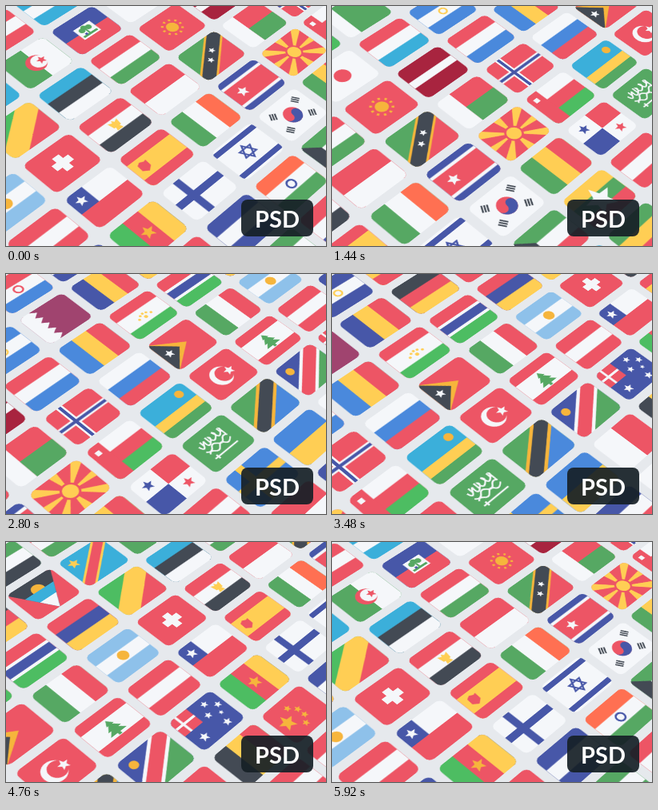
An HTML page that plays this animation: 400x300 px, repeating every 5.96 s.

```html
<!DOCTYPE html>
<html lang="en">
<head>
<meta charset="utf-8">
<title>Flags</title>
<style>
html, body { margin: 0; width: 100%; height: 100%; overflow: hidden; background: #e6e9ed; }
#stage { position: relative; width: 400px; height: 300px; overflow: hidden; background: #e6e9ed; }
#grid { position: absolute; left: 0; top: 0; transform-origin: 0 0; }
#badge {
  position: absolute; left: 294px; top: 242px; width: 90px; height: 46px; border-radius: 8px;
  background: rgba(22, 32, 39, .92); color: #fff; text-align: center;
  font: bold 29px/47px Lato, sans-serif;
}
</style>
</head>
<body>
<div id="stage">
  <svg id="grid" width="2000" height="656"></svg>
  <div id="badge">PSD</div>
</div>
<script>
const CELL_W = 100, CELL_H = 82, W = 85, H = 68, MX = W / 2, MY = H / 2;
const COLORS = {
  r: '#ed5565', w: '#f5f7fa', g: '#56a863', G: '#4dbd62', b: '#4757a8', L: '#4a89dc', s: '#3bafda',
  a: '#8ec1ea', y: '#ffce54', k: '#434a54', o: '#ff7052', m: '#a8243f', q: '#a0446f', n: '#f6b53c'
};

// Shape helpers
const rect = (x, y, w, h, c) => `<rect x="${x}" y="${y}" width="${w}" height="${h}" fill="${COLORS[c]}"/>`;
const disc = (x, y, r, c) => `<circle cx="${x}" cy="${y}" r="${r}" fill="${COLORS[c]}"/>`;
const poly = (pts, c) => `<polygon points="${pts}" fill="${COLORS[c]}"/>`;
const line = (d, c, w, extra = '') =>
  `<path d="${d}" fill="none" stroke="${COLORS[c]}" stroke-width="${w}" ${extra}/>`;
const ring = (x, y, r, c, w, dash = '') =>
  `<circle cx="${x}" cy="${y}" r="${r}" fill="none" stroke="${COLORS[c]}" stroke-width="${w}" stroke-dasharray="${dash}"/>`;
const fill = c => rect(0, 0, W, H, c);

function star(x, y, r, c) {
  const pts = [];
  for (let i = 0; i < 10; i++) {
    const a = i * Math.PI / 5, d = i % 2 ? r * .45 : r;
    pts.push((x + d * Math.sin(a)).toFixed(2), (y - d * Math.cos(a)).toFixed(2));
  }
  return poly(pts, c);
}

// Stripes: each letter is one unit of thickness, repeats make a stripe wider
function stripes(code, upright) {
  const unit = (upright ? W : H) / code.length;
  return fill(code[0]) + [...code.matchAll(/(.)\1*/g)].map(m => {
    const at = m.index * unit;
    return upright ? rect(at, 0, W - at, H, m[1]) : rect(0, at, W, H - at, m[1]);
  }).join('');
}
const rows = code => stripes(code, false);
const cols = code => stripes(code, true);

const cross = (x, c, w) => line(`M${x} 0V${H}M0 ${MY}H${W}`, c, w);
const diagonal = (upper, lower, ...bands) => fill(upper) + poly([W, 0, W, H, 0, H], lower) +
  bands.map(([c, w]) => line('M-17 81.6L102-13.6', c, w)).join('');
const crescent = (x, r, c, back) => disc(x, MY, r, c) + disc(x + r * .3, MY, r * .78, back);

function sunRays() {
  let out = fill('r');
  const end = a => `${MX + 75 * Math.cos(a)},${MY + 60 * Math.sin(a)}`;
  for (let i = 0; i < 8; i++) {
    const a = i * Math.PI / 4;
    out += poly(`${MX},${MY} ${end(a - .15)} ${end(a + .15)}`, 'y');
  }
  return out + disc(MX, MY, 14, 'r') + disc(MX, MY, 11, 'y');
}

function trigrams() {
  let out = '';
  for (const i of [-1, 1]) for (const j of [-1, 1]) {
    const turn = Math.atan2(j * 16, i * 26) * 180 / Math.PI;
    out += `<g transform="translate(${MX + i * 25} ${MY + j * 17}) rotate(${turn})">` +
      line('M-4-6V6M0-6V6M4-6V6', 'k', 2.4) + '</g>';
  }
  return out;
}

const hexagram = line(`M${MX} 21L53.5 40.5H31.5ZM${MX} 47L53.5 27.5H31.5Z`, 'b', 2.6);
const eagle = poly('42,25 45,29 51,26 49,38 46,38 48,44 37,44 39,38 36,38 34,26 40,29', 'y');
const crest = poly('11,27 17,24 23,27 27,26 26,38 18,44 10,38', 'r');
const cedar = poly('42,20 49,29 46,29 54,38 49,38 57,46 45,46 45,50 40,50 40,46 28,46 36,38 31,38 39,29 36,29', 'g');
const palm = rect(26, 21, 33, 26, 'w') + rect(41, 28, 3, 15, 'g') +
  disc(36, 30, 5, 'g') + disc(42, 27, 5, 'g') + disc(49, 30, 5, 'g') + rect(29, 40, 27, 4, 'g') + rect(35, 37, 4, 4, 'b');
const script = line('M17 20q2 12 7 4t5-6q-2 14 6 8t4-9q0 13 7 8t4-9q0 14 7 8t5-8v14M18 33q7 7 12 0t11 0t11 0t11-1' +
  'M20 40q4-6 9 0t11-1t10 0t13-2M24 15v8M35 14v13M48 14l3 10M59 14v9', 'w', 2.4) +
  line('M19 50H65M25 46V54', 'w', 2.6);
const ribbons = fill('r') + poly([0, 0, W, 0, MX, H], 'k') + disc(MX, 22, 11, 'n') +
  poly('15,24 70,24 42.5,68', 's') + poly('27,43 58,43 42.5,68', 'w');
const zigzag = fill('q') + poly([0, 0, 20, 0, 30, 7, 20, 14, 30, 20, 20, 27, 30, 34, 20, 41, 30, 48, 20, 54, 30, 61, 20, 68, 0, 68], 'w');
const southern = fill('b') + rect(0, 0, 36, 32, 'r') + line('M14 0V32M0 16H36', 'w', 4) + star(19, 51, 8, 'w') +
  star(60, 12, 6, 'w') + star(50, 29, 6, 'w') + star(74, 25, 6, 'w') + star(61, 55, 7, 'w') + star(67, 38, 4, 'w');
const taegeuk = disc(MX, MY, 15, 'r') +
  `<path d="M27.5 34a7.5 7.5 0 0 0 15 0a7.5 7.5 0 0 1 15 0a15 15 0 0 1-30 0" fill="${COLORS.b}"/>`;
const dots = [-2, -1, 0, 1, 2].map(i => disc(MX + i * 6, 31 + i * i * 1.6, 2.2, 'y')).join('') + disc(MX, 39, 3, 'y');

// Each line of flags repeats every ten columns
const FLAGS = [
  [rows('rwg'), rows('rwr'), rows('sws'), rows('kwG') + poly('0,0 45,34 0,68', 'r') + star(15, MY, 7, 'w'),
    cols('wggg'), cols('gwg'), rows('rwL') + ring(MX, MY, 7, 'r', 3), rows('bwb') + ring(MX, MY, 6, 'y', 3),
    rows('ryr'), rows('gwk')],
  [diagonal('s', 's', ['y', 22], ['r', 15]) + star(17, 17, 10, 'y'),
    cols('gw') + crescent(MX, 16, 'r', 'w') + star(52, MY, 8, 'r'),
    rows('br') + palm, fill('w') + disc(MX, MY, 12.5, 'r'), rows('rws'),
    rows('LwL') + ring(MX, MY, 6, 'y', 3), zigzag, cols('byr'), rows('kry'), ribbons],
  [diagonal('G', 'r', ['y', 32]), rows('skw'), rows('rwg'),
    fill('r') + disc(MX, MY, 10, 'n') + ring(MX, MY, 15.5, 'n', 4, '3.5 6.24'),
    rows('mmwmm'), rows('rwL'), cols('Lyr'), rows('rrwwwGG') + dots, rows('rrrrwbbbwGGGG'), rows('rby')],
  [fill('r') + rect(27.5, 28, 30, 12, 'w') + rect(36.5, 19, 12, 30, 'w'), rows('rwk') + eagle, rows('rw'),
    diagonal('g', 'r', ['n', 28], ['k', 21]) + star(35, 40, 6, 'w') + star(51, 27, 6, 'w'),
    cols('wrr') + rect(W / 3, MY, W * 2 / 3, MY, 'g'),
    fill('r') + cross(29, 'w', 11) + cross(29, 'b', 5), rows('wLr'),
    fill('r') + poly('0,0 50,34 0,68', 'n') + poly('0,0 35,34 0,68', 'k') + star(14, MY, 8, 'w'),
    cols('gwr'), rows('awa') + disc(MX, MY, 9, 'n')],
  [rows('wr') + rect(0, 0, 32, MY, 'b') + star(16, 17, 9, 'w'), rows('ryyr') + crest, cols('gwo'),
    rows('bbwrrrrrrrwbb') + star(23, MY, 10, 'w'), sunRays(),
    rows('wrG') + rect(0, 0, 25, H, 'r') + rect(8, 10, 8, 8, 'w'), rows('ssyg') + disc(67, 16, 7, 'n'),
    fill('r') + crescent(38, 18, 'w', 'r') + star(54, MY, 9, 'w'), rows('rwwr') + cedar, rows('rwr')],
  [cols('Gry') + star(MX, MY, 11, 'n'), fill('w') + cross(30, 'b', 12),
    fill('w') + rect(0, 4, W, 9, 'b') + rect(0, 55, W, 9, 'b') + hexagram,
    fill('w') + taegeuk + trigrams(), cols('gyr'),
    fill('w') + rect(MX, 0, MX, MY, 'r') + rect(0, MY, MX, MY, 'b') + star(21, 17, 9, 'b') + star(64, 51, 9, 'r'),
    fill('g') + script, diagonal('g', 'L', ['n', 30], ['k', 20]),
    diagonal('b', 'g', ['w', 30], ['r', 20]) + disc(18, 17, 7, 'n'), southern],
  [fill('r') + star(20, 34, 14, 'n') + star(39, 17, 6, 'n') + star(49, 28, 6, 'n') + star(49, 41, 6, 'n') + star(39, 52, 6, 'n'),
    rows('bwb'), rows('owg') + ring(MX, MY, 7, 'b', 3), rows('gwr') + poly([0, 0, 25, 22, 25, 46, 0, H], 'k'),
    rows('ygr') + star(MX, 36, 24, 'w'), rows('rwr'), fill('L') + cross(30, 'y', 13), rows('Ly'), cols('wr'), cols('kyr')],
  [rows('rwr'), rows('gwg'), rows('rwb'), fill('s') + disc(MX, MY, 11, 'y') + ring(MX, MY, 16, 'y', 4, '3 4.2'),
    rows('gyr'), fill('r') + poly([0, 0, W, H, 0, H], 'k') + star(20, 44, 6, 'w') + star(33, 56, 5, 'w'),
    rows('rw'), rows('bwr'), rows('wr'), rows('rwr')]
];

const grid = document.getElementById('grid');
let art = `<clipPath id="card"><rect width="${W}" height="${H}" rx="9.5"/></clipPath>`;
FLAGS.forEach((list, row) => {
  for (let i = 0; i < 20; i++) {
    const x = i * CELL_W + (CELL_W - W) / 2, y = row * CELL_H + (CELL_H - H) / 2;
    art += `<g transform="translate(${x} ${y})" clip-path="url(#card)">${list[(i + 8) % 10]}</g>`;
  }
});
grid.innerHTML = art;

const LOOP = 5960, FRAME = 40, BEND = 4760, BEND_STEPS = 7.855;
const VIEW = 'matrix3d(.711,-.425,0,.000357,.6183,.4732,0,-.0001927,0,0,1,0,71,196,0,1)';

// Columns travelled; the last stretch runs a little faster to close the loop
const travel = t => t < BEND ? t / BEND * BEND_STEPS
  : BEND_STEPS + (t - BEND) / (LOOP - BEND) * (10 - BEND_STEPS);

const start = performance.now();
function draw() {
  const t = Math.floor((performance.now() - start) % LOOP / FRAME) * FRAME;
  grid.style.transform = `${VIEW} translate(${-(travel(t) + 2.5) * CELL_W}px, ${-3.5 * CELL_H}px)`;
  requestAnimationFrame(draw);
}
draw();
</script>
</body>
</html>
```
